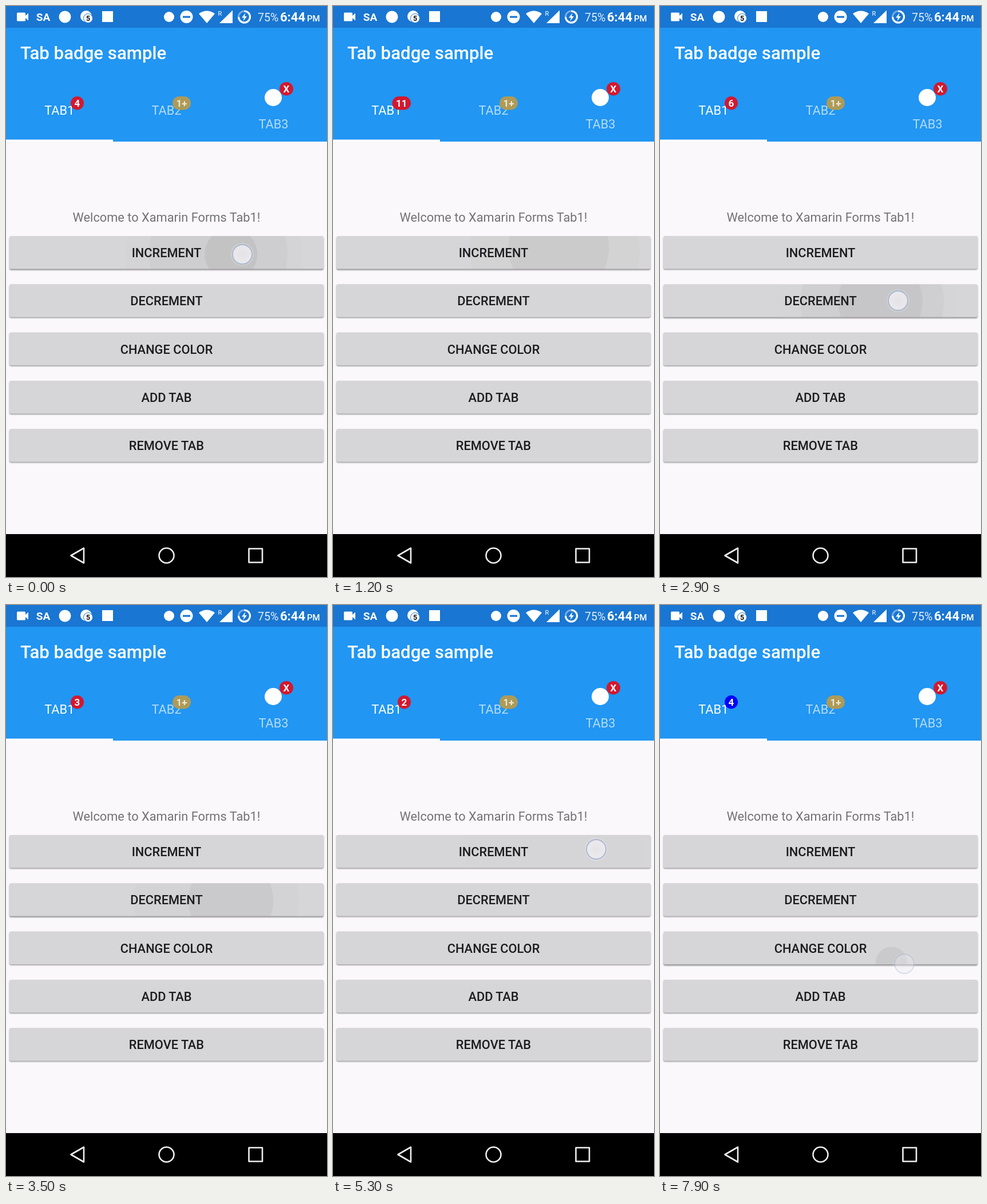
Write an HTML page that moves like this. It is 561 px wide and 998 px high and loops after 8000 ms.

```html
<!DOCTYPE html>
<html lang="en">
<head>
<meta charset="utf-8">
<title>Tab badge sample</title>
<style>
  html, body { margin: 0; width: 100%; height: 100%; overflow: hidden; background: #faf8fb; }
  svg { display: block; width: 100vw; height: 100vh; font-family: Roboto, sans-serif; font-size: 21.8px; }
  .mid { text-anchor: middle; }
  .med { font-weight: 500; }
  .bold { font-weight: 700; }
  .badge { font-weight: 700; font-size: 17px; text-anchor: middle; fill: #fff; }
</style>
</head>
<body>
<svg viewBox="0 0 561 998" preserveAspectRatio="none">
  <defs>
    <filter id="soft" x="-5%" y="-30%" width="110%" height="160%"><feGaussianBlur stdDeviation="1.3"/></filter>
    <radialGradient id="glow">
      <stop offset="0" stop-color="#e6e4e7"/><stop offset=".82" stop-color="#edebef"/><stop offset="1" stop-color="#e2e4ea"/>
    </radialGradient>
  </defs>
  <rect width="561" height="998" fill="#faf8fb"/>
  <rect width="561" height="237" fill="#2196f3"/>
  <rect width="561" height="38" fill="#1976d2"/>

  <g id="status" fill="#fff">
    <path d="M20.5 11.500h12q1.500 0 1.500 1.500v4l5-4.500v13l-5-4.500v4q0 1.500-1.500 1.500h-12q-1.500 0-1.500-1.500v-12q0-1.500 1.500-1.500z"/>
    <text class="bold" x="65" y="26" font-size="19" text-anchor="middle">SA</text>
    <circle cx="103" cy="19" r="10.500"/>
    <circle cx="140" cy="18" r="10"/>
    <circle cx="143.500" cy="21.500" r="8" stroke="#1976d2"/>
    <text class="bold mid" x="143.500" y="26" font-size="12.500" fill="#111">5</text>
    <rect x="168" y="9" width="19" height="19"/>
    <circle cx="285" cy="19" r="9"/>
    <circle cx="315.500" cy="19" r="11"/>
    <rect x="309" y="17.500" width="13" height="3.200" fill="#1976d2"/>
    <path d="M337 13.500Q351 3.500 365 13.500L351 30z"/>
    <text x="370.500" y="17" font-size="11">R</text>
    <path d="M373 30L396 7.500V30z"/>
    <circle cx="416.500" cy="19" r="10" fill="none" stroke="#fff" stroke-opacity=".4" stroke-width="3"/>
    <path d="M416.500 9a10 10 0 1 1-10 10" fill="none" stroke="#fff" stroke-width="3"/>
    <path d="M418.500 12l-6.500 8.500h4l-1.500 6 6.500-8.500h-4z"/>
    <text x="440" y="26.500" font-size="19.500" fill="#e4eefa">75%</text>
    <text class="bold" x="479" y="27" font-size="22">6:44</text>
    <text class="med" x="526" y="27" font-size="15">PM</text>
  </g>

  <text class="med" x="25" y="93" font-size="31.200" fill="#fff">Tab badge sample</text>
  <text class="mid" x="93.300" y="189.500" fill="#fff">TAB1</text>
  <g fill="#b5dbfb">
    <text class="mid" x="280.500" y="189.500">TAB2</text>
    <text class="mid" x="467.500" y="214">TAB3</text>
  </g>
  <circle cx="467" cy="160" r="15" fill="#fff"/>
  <rect y="233.500" width="187" height="3.500" fill="#fff"/>

  <g id="badge">
    <rect y="158" height="23.500" rx="11.700"/>
    <text class="badge" y="176"></text>
  </g>
  <rect x="291" y="158" width="32" height="23.500" rx="11.700" fill="#ad9b58"/>
  <text class="badge" x="307" y="176" style="fill:#eee7d6">1+</text>
  <rect x="478" y="133" width="24" height="23.500" rx="11.700" fill="#d3182f"/>
  <text class="badge" x="490" y="151">X</text>

  <text class="mid" x="280.500" y="377.300" fill="#747276">Welcome to Xamarin Forms Tab1!</text>
  <g id="buttons"></g>
  <g id="touches"></g>

  <rect y="923" width="561" height="75"/>
  <g fill="none" stroke="#eee" stroke-width="2.600" stroke-linejoin="round">
    <path d="M113.500 960.500L136 947.500V973.500z"/>
    <circle cx="280.500" cy="960.500" r="13"/>
    <rect x="424.500" y="948.500" width="23.500" height="24"/>
  </g>
</svg>
<script>
const NS = 'http://www.w3.org/2000/svg';
const LOOP = 8000, RED = '#d3182f';
const INC = 0, DEC = 1, COLOR = 2;
const $ = id => document.getElementById(id);

function set(node, attrs) {
  for (const k in attrs) node.setAttribute(k, attrs[k]);
  return node;
}
function add(parent, tag, attrs) {
  return parent.appendChild(set(document.createElementNS(NS, tag), attrs));
}

const live = [[0, 1200], [2000, 4200], [4500, 5000], [5300, 5500],
  [6100, 6300], [6600, 6800], [7400, 7600], [7800, 7900]];

const buttonTop = i => 402 + i * 84.3;
const buttons = ['INCREMENT', 'DECREMENT', 'CHANGE COLOR', 'ADD TAB', 'REMOVE TAB'].map((label, i) => {
  const y = buttonTop(i), box = { x: 6, width: 549, height: 57.5, rx: 3 };
  const clip = add(document.querySelector('defs'), 'clipPath', { id: 'clip' + i });
  add(clip, 'rect', { ...box, y });
  const shadow = add($('buttons'), 'rect', { ...box, y: y + 1.5, fill: '#000', 'fill-opacity': .4, filter: 'url(#soft)' });
  add($('buttons'), 'rect', { ...box, y, fill: '#d6d5d7' });
  const waves = add($('buttons'), 'g', { 'clip-path': `url(#clip${i})` });
  add($('buttons'), 'text', { class: 'mid med', x: 280.5, y: y + 37, fill: '#1c1b1d' }).textContent = label;
  return { y, shadow, waves };
});

const taps = [], badgeSteps = [{ at: -1, count: 4, color: RED }];

function tap(t, button, x, y, change, opt = {}) {
  const wave = add(buttons[button].waves, 'circle', {});
  const touch = add($('touches'), 'g', {});
  add(touch, 'circle', { r: 20, fill: '#fff', 'fill-opacity': .18 });
  add(touch, 'circle', { r: 17, fill: 'url(#glow)', 'fill-opacity': .9, stroke: '#a9b8d0', 'stroke-width': 1.8 });
  taps.push({ t, button, x, y, touchX: opt.touchX || x, wave, touch });
  if (change) badgeSteps.push({ ...badgeSteps[badgeSteps.length - 1], at: opt.at || t + 30, ...change });
}

tap(-390, INC, 418, 432);
tap(-220, INC, 411, 433);
tap(-58, INC, 408, 434);
for (let i = 0; i < 7; i++) tap(94 + i * 126.7, INC, 413 + i * 6.5, 434 - i * 2, { count: 5 + i });
tap(1068, INC, 427, 419, { count: 12 }, { at: 1800 });
for (let i = 0; i < 5; i++) tap(2010 + i * 164, DEC, 413, 518, { count: 11 - i });
tap(2796, DEC, 409, 516, { count: 6 });
for (let i = 0; i < 6; i++) tap(2970 + i * 212.6, DEC, 416 + i * 1.6, 515 + i, { count: 5 - i });
tap(4570, INC, 448, 430, { count: 1 });
tap(4900, INC, 455, 428, { count: 2 });
tap(5370, INC, 460, 427, { count: 3 });
tap(6170, COLOR, 432, 600, { color: '#00ffff' });
tap(6670, COLOR, 432, 597, { color: '#000000' });
tap(7470, INC, 440, 430, { count: 4 });
tap(7867, COLOR, 414, 627, { color: '#0000ff' }, { touchX: 427 });

function screenTime(t) {
  let shown = 0;
  for (const [from, to] of live) if (t >= from) shown = Math.min(t, to);
  return shown;
}

function drawTap(p, t) {
  const age = t - p.t, mid = buttons[p.button].y + 28.7;
  const r = age > 0 ? 180 * (1 - Math.exp(-age / 197)) : 0;
  const pull = .7 * r / 276;
  set(p.wave, {
    cx: p.x + (280.5 - p.x) * pull,
    cy: p.y + (mid - p.y) * pull,
    r,
    'fill-opacity': age > 0 ? Math.max(0, .058 * (1 - age / 440)) : 0
  });
  const shown = age < -100 ? 0 : Math.max(0, Math.min(1, (50 - age) / 40));
  set(p.touch, { transform: `translate(${p.touchX} ${p.y})`, opacity: shown });
  return age > -20 && age < 150;
}

function drawBadge(t) {
  const { count, color } = badgeSteps.filter(s => s.at <= t).pop();
  const [pill, label] = $('badge').children;
  const width = count > 9 ? 32.5 : 23;
  set($('badge'), { visibility: count ? 'visible' : 'hidden' });
  set(pill, { x: 136 - width, width, fill: color });
  set(label, { x: 136 - width / 2 });
  label.textContent = count;
}

function draw(time) {
  const t = Math.floor((time % LOOP) / 100) * 100;
  const shown = screenTime(t);
  const pressed = new Set();
  for (const p of taps) if (drawTap(p, shown)) pressed.add(p.button);
  buttons.forEach((b, i) => set(b.shadow, { y: b.y + (pressed.has(i) ? 2.3 : 1.5) }));
  drawBadge(t);
}

let start;
function tick(now) {
  start ??= now;
  draw(now - start);
  requestAnimationFrame(tick);
}
draw(0);
requestAnimationFrame(tick);
</script>
</body>
</html>
```
